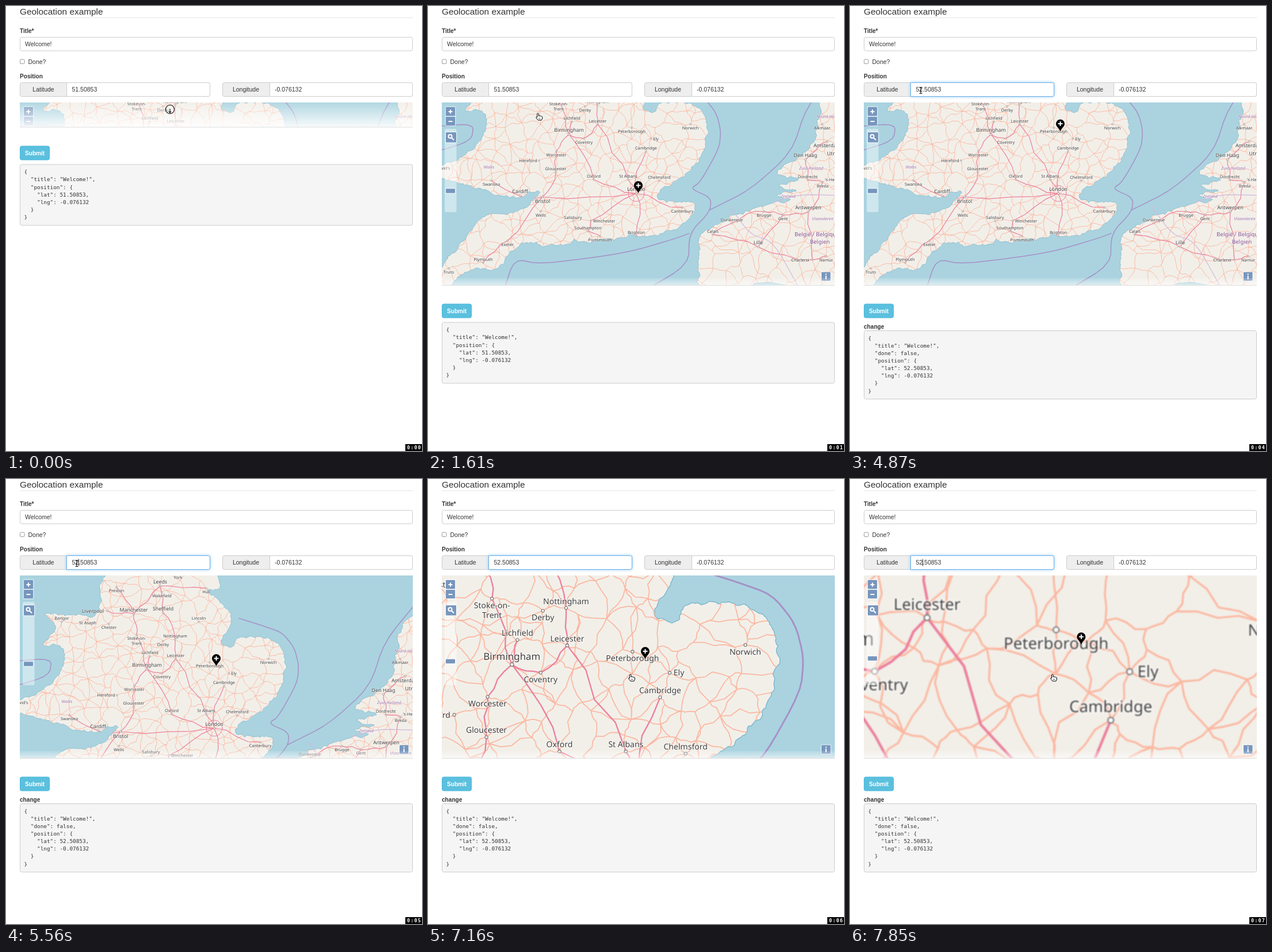
An HTML page for the animation above (7990 ms loop, 723 px wide and 775 px high).

```html
<!DOCTYPE html>
<html lang="en">
<head>
<meta charset="utf-8">
<title>Geolocation example</title>
<style>
  html, body { margin: 0; width: 100%; height: 100%; overflow: hidden; background: #fff; }
  svg { display: block; width: 723px; height: 775px; font: 10.5px "Liberation Sans", Arial, sans-serif; fill: #333; }
  .bold { font-weight: bold; font-size: 10.1px; }
  .mono { font: 9.37px "DejaVu Sans Mono", monospace; }
  .mono text { white-space: pre; }
  .box { fill: #fff; stroke: #ccc; }
  .addon { fill: #eee; stroke: #ccc; }
  .focus { stroke: #66afe9; filter: drop-shadow(0 0 2.5px rgba(102, 175, 233, .7)); }
  .line { fill: none; stroke-linejoin: round; stroke-linecap: round; }
  .label { font-family: "Noto Sans", sans-serif; text-anchor: middle; text-rendering: geometricPrecision; fill: #404040;
           paint-order: stroke; stroke: rgba(255, 255, 255, .6); stroke-width: 1.2px; stroke-linejoin: round; }
  .region { font-style: italic; fill: #9a6fa8; }
  .country { fill: #84508f; }
  .button { fill: #7796be; stroke: rgba(255, 255, 255, .45); stroke-width: 3px; paint-order: stroke; }
  .glyph { stroke: #fff; stroke-width: 2; fill: none; }
</style>
</head>
<body>
<svg viewBox="0 0 723 775">
  <defs>
    <clipPath id="window"><rect id="windowRect" x="24" y="168" width="683"/></clipPath>
    <clipPath id="landClip"><path id="landShape"/></clipPath>
    <linearGradient id="fade" x2="0" y2="1">
      <stop stop-color="#fff" stop-opacity=".1"/><stop id="fadeEnd" offset="1" stop-color="#fff"/>
    </linearGradient>
  </defs>
  <rect width="723" height="775" fill="#fff"/>

  <text x="24" y="15" font-size="15.4">Geolocation example</text>
  <path d="M24 20.5H707" stroke="#e5e5e5"/>
  <text class="bold" x="24" y="46.5">Title*</text>
  <rect class="box" x="24.5" y="54.5" width="682" height="23.5" rx="3"/>
  <text x="33" y="70">Welcome!</text>
  <rect x="24.5" y="93" width="7.5" height="7.5" rx="1.5" fill="#fff" stroke="#999"/>
  <text x="38.5" y="100.5">Done?</text>
  <text class="bold" x="24" y="125.5">Position</text>
  <rect class="addon" x="24.5" y="133.5" width="330" height="24" rx="3"/>
  <text x="65" y="149" text-anchor="middle">Latitude</text>
  <path id="latBox" class="box" d="M105.5 133.5H351.5q3 0 3 3V154.5q0 3 -3 3H105.5z"/>
  <text id="latText" x="114.5" y="149"></text>
  <path id="caret" d="M126.5 139.5V151.5" stroke="#222"/>
  <rect class="addon" x="376.5" y="133.5" width="330" height="24" rx="3"/>
  <text x="417" y="149" text-anchor="middle">Longitude</text>
  <path class="box" d="M458.5 133.5H703.5q3 0 3 3V154.5q0 3 -3 3H458.5z"/>
  <text x="467" y="149">-0.076132</text>

  <g clip-path="url(#window)">
    <rect x="24" y="168" width="683" height="319" fill="#aad3df"/>
    <g id="world"></g>
    <g id="pin">
      <path d="M0 0C-2 -6 -7.5 -8 -7.5 -13.5A7.5 7.5 0 0 1 7.5 -13.5C7.5 -8 2 -6 0 0z" fill="#000"/>
      <path d="M-4 -13.5H4M0 -17.5V-9.5" class="glyph"/>
    </g>
    <rect x="29" y="214" width="20.5" height="145" rx="2" fill="#fff" opacity=".42"/>
    <rect class="button" x="31" y="176" width="16" height="15.5" rx="1"/>
    <rect class="button" x="31" y="193" width="16" height="15" rx="1"/>
    <path class="glyph" d="M35.5 184H42.5M39 180.5V187.5M35.5 201H42.5"/>
    <rect class="button" x="31" y="220" width="18" height="17.5" rx="1"/>
    <circle class="glyph" cx="38.5" cy="227" r="3" stroke-width="1.5"/>
    <path class="glyph" d="M41 229.5L45 233.5"/>
    <rect id="thumb" class="button" x="31" width="16" height="7.5" rx="1"/>
    <rect class="button" x="684" y="463.5" width="15.5" height="15" rx="1"/>
    <path class="glyph" d="M691.7 466V468M691.7 469.5V476"/>
    <rect id="fadeRect" x="24" width="683" fill="url(#fade)"/>
  </g>
  <path id="mapEdge" d="M24 0H707" stroke="#ddd"/>

  <g id="below">
    <rect x="24.5" y="244" width="51" height="24" rx="3" fill="#5bc0de" stroke="#46b8da"/>
    <text x="33" y="259.5" class="bold" style="fill:#fff">Submit</text>
    <text id="changeLabel" class="bold" x="24" y="286.5">change</text>
    <g id="panel">
      <rect id="panelBox" x="24.5" y="276" width="682" rx="3" fill="#f5f5f5" stroke="#ccc"/>
      <g id="json" class="mono"></g>
    </g>
  </g>

  <rect x="694" y="763" width="29" height="12" fill="#000"/>
  <text id="clock" x="697" y="772" style="font:bold 8.5px 'DejaVu Sans Mono',monospace;letter-spacing:1.1px;fill:#fff"></text>

  <g id="cursor">
    <g id="hand">
      <path d="M-1.5 1Q0 -1 1 1V5Q3 3.5 4 5Q5.5 4.3 6 5.7Q7.5 5.2 7.5 7V9L6 12H0L-3.5 7.5Q-3.5 5.5 -1.5 7z" fill="#fff" stroke="#000"/>
      <path d="M1.5 8V10M3.5 8V10" stroke="#000" stroke-width=".7"/>
    </g>
    <path id="beam" d="M-2.5 -5.5Q0 -5.5 0 -4Q0 -5.5 2.5 -5.5M0 -4V4M-2.5 5.5Q0 5.5 0 4Q0 5.5 2.5 5.5M-1.5 1.5H1.5" fill="none" stroke="#111" stroke-width="1.1"/>
    <path id="ring" d="M-7.5 -2a7.5 7.5 0 1 1 15 0a7.5 7.5 0 1 1 -15 0M0 -3V4M-2 1.5L0 4L2 1.5" fill="none" stroke="#111" stroke-width="1.2"/>
  </g>
</svg>
<script>
const $ = id => document.getElementById(id);
const set = (el, attrs) => { for (const k in attrs) el.setAttribute(k, attrs[k]); return el; };
const add = (parent, tag, attrs, text = '') => {
  const el = set(document.createElementNS('http://www.w3.org/2000/svg', tag), attrs);
  el.textContent = text;
  return parent.appendChild(el);
};
const show = (el, on) => el.style.display = on ? '' : 'none';

let seed = 7;
const random = () => (seed = (seed * 16807) % 2147483647) / 2147483647;

// ---- map geometry ----
const points = s => s.trim().split(/\s+/).map(p => p.split(',').map(Number));
const pathOf = pts => 'M' + pts.map(p => p.map(v => v.toFixed(1)).join(' ')).join('L');
const mix = (a, b, f) => a.map((v, i) => v + (b[i] - v) * f);
const distance = (a, b) => Math.hypot(a[0] - b[0], a[1] - b[1]);
const repeat = (n, fn, value) => n ? repeat(n - 1, fn, fn(value)) : value;

// Corner cutting that keeps both ends.
const smooth = pts => repeat(2, p => [p[0],
  ...p.slice(1).flatMap((b, i) => [mix(p[i], b, .2), mix(p[i], b, .8)]), p[p.length - 1]], pts);

// Midpoint displacement gives coasts and roads their wobble.
const rough = (pts, amount) => repeat(2, p => p.flatMap((a, i) => {
  const b = p[i + 1];
  if (!b) return [a];
  const k = (random() - .5) * amount, [x, y] = mix(a, b, .5);
  return [a, [x - (b[1] - a[1]) * k, y + (b[0] - a[0]) * k]];
}), pts);

const island = `10,283 60,265 100,225 100,180 58,185 92,150 62,125 100,128 165,135 170,40 355,40 378,85 342,85
  385,115 394,143 369,180 395,187 400,168 440,166 475,178 488,210 479,255 455,288 430,305 390,335 440,342
  467,342 455,374 405,400 300,405 210,420 165,408 118,462 85,455 45,475 40,500 10,500 24,450
  75,392 95,363 165,358 203,318 150,338 85,315 10,298`;
const mainland = `720,125 690,140 680,200 658,260 595,292 655,302 600,314 650,322 598,328 640,338 560,352
  495,385 470,400 470,440 466,500 720,500`;
const seaBorders = ['405,135 449,149 480,160 501,186 509,217 506,248 473,307 456,318 492,334 490,358 454,396 453,450 370,500',
  '130,500 150,440 195,450 345,430 430,405 454,396', '490,355 560,320 632,255 658,175 720,100', '10,210 80,205 75,235 10,255'];
const landBorders = ['525,350 560,398 600,410 650,500', '600,342 645,328 720,330'];

// The sign after a name tells on which side of the label its dot lies; * means no dot.
const townLists = {
  8.8: "Leeds_268,71|Liverpool>151,122|Manchester_222,120|Sheffield_273,118|Birmingham_245,216|London_362,319|Cardiff_160,323|Bristol^199,340|Lille_574,412|Antwerpen_661,351|Den Haag_656,260|Amsterdam^694,243|Utrecht*709,257",
  7.3: "York*299,64|Wakefield^271,96|Preston^192,87|Hull^348,89|Lincoln_335,135|Nottingham_294,166|Chester^179,151|St Asaph^142,143|Bangor_97,135|Stoke-on-^227,170|Trent*227,179|Derby^273,181|Lichfield_250,195|Leicester_295,200|Peterborough^354,218|Norwich^456,212|Coventry^271,237|Ely<396,231|Cambridge_379,247|Worcester^223,259|Hereford>174,269|" +
    "Gloucester_222,283|Oxford_288,296|St Albans_348,296|Chelmsford_402,298|Swansea^110,310|Wells^196,364|Salisbury_252,368|Winchester<306,374|Southampton_278,386|Portsmouth^299,407|Brighton_362,394|Canterbury^442,357|Exeter^138,415|Plymouth_96,441|Truro^36,463|vid's*31,282|" +
    "Calais_495,392|Dunkerque_528,372|Brugge^584,364|Gent^617,370|Charleroi>647,442|Namur^692,442|Breda^686,313|Dordrecht_660,297|Alkmaar^685,212|'s-Hertogenbosch*720,302"
};
const regions = "Wales*106,280|Noord-Holland*699,192|Zuid-Holland*666,282|Zeeland*626,331|Vlaanderen*686,370";
const countries = "België / Belgique*676,398|Belgien*681,411";

const motorways = `London,St Albans,Leicester,Nottingham,Sheffield,Leeds|London,Oxford,Birmingham,Stoke-on-,Manchester,Preston
  |Lichfield,Birmingham,Coventry,Leicester|London,Bristol,Cardiff,Swansea|Birmingham,Worcester,Gloucester,Bristol,Exeter,Plymouth
  |London,Winchester,Southampton,Portsmouth|London,Cambridge|London,Canterbury|London,Brighton|Liverpool,Manchester,Leeds,Hull
  |Calais,Dunkerque,Brugge,Gent,Antwerpen,Breda|Calais,Lille,Gent|Lille,Charleroi,Namur|Antwerpen,Charleroi
  |Breda,Dordrecht,Den Haag,Amsterdam`;

const parseTowns = (list, size) => list.split('|').map(s => {
  const [, name, side, x, y] = s.match(/^(.+)([\^_<>*])(\d+),(\d+)$/);
  const half = name.length * size * .29 + 2, gap = size * .85;
  const [dx, dy] = { '^': [0, -gap], '_': [0, gap], '<': [-half, 0], '>': [half, 0], '*': [0, 0] }[side];
  return { name, size, x: +x, y: +y, dot: [+x + dx, +y + dy], dotted: side !== '*' };
});
const towns = Object.entries(townLists).flatMap(([size, list]) => parseTowns(list, +size));

function drawLabel(parent, { name, size, x, y, dot, dotted }, kind = '') {
  if (dotted) add(parent, 'circle', { cx: dot[0], cy: dot[1], r: size * .18, fill: '#fff', stroke: '#777', 'stroke-width': .6 });
  add(parent, 'text', { class: 'label ' + kind, x, y: y + size * .35, 'font-size': size }, name);
}

// Gabriel graph over towns and scattered villages: link two when no third lies between them.
function minorRoads() {
  const nodes = towns.filter(t => t.dotted).map(t => t.dot);
  for (let y = 55; y < 500; y += 23)
    for (let x = 15; x < 720; x += 23) nodes.push([x + random() * 21, y + random() * 21]);
  return nodes.map((a, i) => {
    const near = nodes.filter(b => b !== a && distance(a, b) < 50);
    return near.filter(b => nodes.indexOf(b) > i)
      .filter(b => near.every(c => c === b || distance(c, mix(a, b, .5)) > distance(a, b) / 2))
      .map(b => pathOf(rough([a, b], .35))).join('');
  }).join('');
}

function buildMap() {
  const world = $('world');
  const land = [island, mainland].map(s => pathOf(rough(smooth(points(s)), .5)) + 'z').join('');
  const line = (parent, d, stroke, width) => add(parent, 'path', { class: 'line', d, stroke, 'stroke-width': width });
  const border = list => list.map(s => pathOf(smooth(points(s)))).join('');
  const routes = motorways.split('|').map(route =>
    pathOf(rough(route.trim().split(',').map(name => towns.find(t => t.name === name).dot), .22))).join('');
  $('landShape').setAttribute('d', land);
  add(world, 'path', { d: land, fill: '#f2efe9', stroke: '#79b5cb', 'stroke-width': .7 });
  const roads = add(world, 'g', { 'clip-path': 'url(#landClip)' });
  line(roads, minorRoads(), '#fbb7a0', .9);
  line(roads, routes, '#ec7f9c', 1.2);
  const [cx, cy] = towns.find(t => t.name === 'London').dot;
  add(roads, 'circle', { class: 'line', cx, cy, r: 14, stroke: '#ec7f9c' });
  line(world, border(landBorders), '#d3b8dc', 1.2);
  line(world, border(seaBorders), '#a690c6', 1.5);
  towns.forEach(t => drawLabel(world, t));
  parseTowns(regions, 7.3).forEach(t => drawLabel(world, t, 'region'));
  parseTowns(countries, 9.8).forEach(t => drawLabel(world, t, 'country'));
}

// ---- timeline ----
const LOOP = 7990, FOCUS_AT = 2590, DELETE_AT = 4030, RETYPE_AT = 4290, BLINK = 570;
const center = [352.5, 339.5];

// Progress 0..1 in n jumps, the first at `from` and the last at `to`.
const stepped = (t, from, to, n) =>
  Math.max(0, Math.min(n, Math.floor((t - from) / (to - from) * (n - 1) + 1.001))) / n;
const easeOut = p => 1 - (1 - p) ** 2;

let shownJson = '';
function drawJson(lat, changed) {
  const lines = ['{', '  "title": "Welcome!",', ...(changed ? ['  "done": false,'] : []),
    '  "position": {', `    "lat": ${lat},`, '    "lng": -0.076132', '  }', '}'];
  if (shownJson === lines.join()) return;
  shownJson = lines.join();
  $('json').textContent = '';
  lines.forEach((s, i) => add($('json'), 'text', { x: 31.5, y: 292.3 + i * 13.1 }, s));
  $('panelBox').setAttribute('height', changed ? 119 : 106);
  $('panel').setAttribute('transform', `translate(0 ${changed ? 14.5 : 0})`);
  show($('changeLabel'), changed);
}

function render(t) {
  const open = stepped(t, 150, 320, 2);
  const pan = 107.5 * easeOut(stepped(t, 5320, 5560, 3));
  const zoom = 1.926 * stepped(t, 7010, 7850, 7) ** .57;
  const scale = 2 ** zoom;
  const lat = t < DELETE_AT ? '51.50853' : t < RETYPE_AT ? '5.50853' : '52.50853';

  const height = 43 + 275.5 * open, fadeHeight = 43 - 30 * open;
  set($('windowRect'), { height });
  set($('fadeRect'), { y: 168 + height - fadeHeight, height: fadeHeight });
  set($('fadeEnd'), { 'stop-opacity': .9 - .3 * open });
  set($('mapEdge'), { transform: `translate(0 ${168 + height})` });
  set($('below'), { transform: `translate(0 ${275 * open})` });

  const place = (x, y) => [center[0] + scale * (x - center[0]), center[1] + scale * (y + pan - center[1])];
  set($('world'), { transform: `translate(${place(0, 0)}) scale(${scale})` });
  $('world').style.filter = zoom ? 'blur(.22px)' : '';
  set($('pin'), { transform: `translate(${place(365.5, 326 - 107.5 * (parseFloat(lat) - 51.50853))})` });
  set($('thumb'), { y: 318.3 - 4.9 * zoom });

  const lastInput = t < RETYPE_AT ? FOCUS_AT : RETYPE_AT;
  $('latText').textContent = lat;
  $('latBox').classList.toggle('focus', t >= FOCUS_AT);
  set($('caret'), { transform: `translate(${(lat.indexOf('.') - 2) * 6} 0)` });
  show($('caret'), t >= FOCUS_AT && (t - lastInput) % (2 * BLINK) < BLINK);
  drawJson(lat, t >= DELETE_AT);
  $('clock').textContent = '0:0' + Math.floor(t / 1025);

  const aside = stepped(t, 920, 1170, 3), up = stepped(t, 1470, 2450, 8), back = stepped(t, 6010, 6710, 6);
  const x = 285 - 71 * aside - 91 * up + 229 * back, y = 182 + 18 * aside - 53 * up + 193 * back;
  const pressed = t < 150, onMap = y > 165;
  set($('cursor'), { transform: `translate(${x} ${y})` });
  show($('hand'), onMap && !pressed);
  show($('beam'), !onMap);
  show($('ring'), pressed);
}

buildMap();
const start = performance.now();
(function frame() {
  render((performance.now() - start) % LOOP);
  requestAnimationFrame(frame);
})();
</script>
</body>
</html>
```
